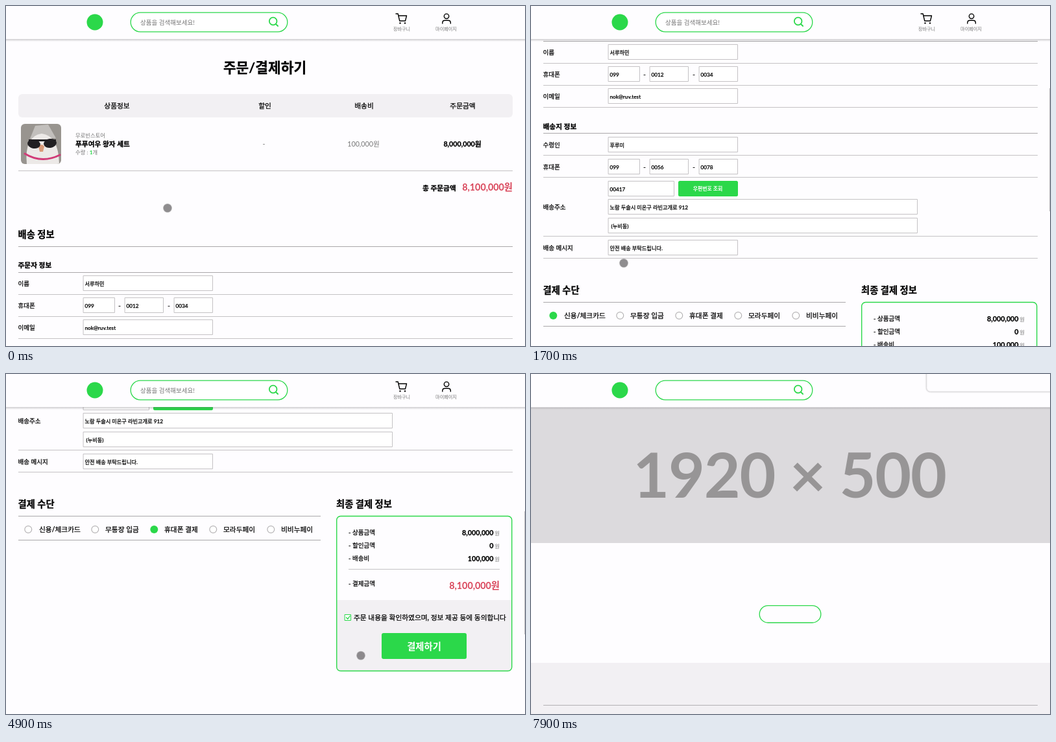
An HTML page with a canvas for the animation above (8 s loop, 800 px wide and 525 px high).

```html
<!DOCTYPE html>
<html lang="ko">
<head>
<meta charset="utf-8">
<title>주문/결제하기</title>
<style>
html, body { margin: 0; width: 100%; height: 100%; overflow: hidden; background: #fefdff; }
canvas { display: block; width: 800px; height: 525px; }
</style>
</head>
<body>
<canvas id="stage" width="800" height="525"></canvas>
<script>
const ctx = document.getElementById('stage').getContext('2d');
const FONT = 'Lato, "Noto Sans CJK KR", "Noto Sans CJK", sans-serif';
const PAGE = '#fefdff', PANEL = '#f2f0f3', GREEN = '#2bd84a', RED = '#d9455a';
const INK = '#000', MUTED = '#767676', LINE = '#c4c2c4', DARK_LINE = '#a9a7a9';
const LOOP = 8000, STEP = 100;

// Rem-like sizes of the scaled-down page
const XS = 7.14, S = 8.33, M = 9.53, L = 10.7, XL = 14.29;

// One entry per wheel notch
const NOTCH = 59.5;
const wheel = [100, 300, 500, 702, 1000, 1300, 1900, 2050, 3648, 4700];
const pointer = [
  [0, 249, 312], [800, 213, 335], [1700, 143, 397], [2300, 137, 366],
  [2900, 137, 362], [3200, 228, 362], [3400, 228, 362], [3800, 510, 420],
  [4100, 527, 436], [4700, 527, 436], [5500, 655, 428]
];
const methods = [
  [34, 51, '신용/체크카드'], [137, 153, '무통장 입금'], [228, 244, '휴대폰 결제'],
  [319, 335, '모라두페이'], [408, 424, '비비누페이']
];

function ease(x) {
  x = Math.min(1, Math.max(0, x));
  return x * x * (3 - 2 * x);
}

function scrollAt(t) {
  return Math.round(NOTCH * wheel.reduce((sum, start) => sum + ease((t - start) / 200), 0));
}

function pointerAt(t) {
  for (let i = 1; i < pointer.length; i++) {
    const [t0, x0, y0] = pointer[i - 1], [t1, x1, y1] = pointer[i];
    if (t < t1) {
      const k = ease((t - t0) / (t1 - t0));
      return [x0 + (x1 - x0) * k, y0 + (y1 - y0) * k];
    }
  }
  return pointer[pointer.length - 1].slice(1);
}

// y is the vertical middle of the glyphs; a hairline outline thickens medium and bold
function text(str, x, y, size, color = INK, weight = 500, align = 'left') {
  ctx.font = `${weight} ${size}px ${FONT}`;
  ctx.fillStyle = ctx.strokeStyle = color;
  ctx.textAlign = align;
  ctx.fillText(str, x, y + size * 0.37);
  if (weight < 500 || color !== INK) return;
  ctx.lineWidth = 0.25;
  ctx.lineJoin = 'round';
  ctx.strokeText(str, x, y + size * 0.37);
}

function bold(str, x, y, size, color, align) {
  text(str, x, y, size, color, 700, align);
}

function rule(x0, x1, y, color = LINE) {
  ctx.fillStyle = color;
  ctx.fillRect(x0, y, x1 - x0, 1);
}

function box(x, y, w, h, r, fill, stroke, lw = 1) {
  ctx.beginPath();
  ctx.roundRect(x, y, w, h, r);
  if (fill) { ctx.fillStyle = fill; ctx.fill(); }
  if (stroke) { ctx.strokeStyle = stroke; ctx.lineWidth = lw; ctx.stroke(); }
}

function disc(x, y, r, fill, stroke, lw = 1) {
  ctx.beginPath();
  ctx.arc(x, y, r, 0, Math.PI * 2);
  if (fill) { ctx.fillStyle = fill; ctx.fill(); }
  if (stroke) { ctx.strokeStyle = stroke; ctx.lineWidth = lw; ctx.stroke(); }
}

function strokePath(d, color, lw) {
  ctx.strokeStyle = color;
  ctx.lineWidth = lw;
  ctx.lineCap = ctx.lineJoin = 'round';
  ctx.stroke(new Path2D(d));
}

function field(value, x, y, w) {
  box(x + 0.5, y + 0.5, w - 1, 23, 0, '#fff', LINE);
  text(value, x + 2.5, y + 12.5, 8.2);
}

function phone(y, a, b, c) {
  text('휴대폰', 18.5, y + 12.5, M);
  field(a, 119, y, 49);
  text('-', 175, y + 12.5, M, INK, 500, 'center');
  field(b, 183, y, 60);
  text('-', 251, y + 12.5, M, INK, 500, 'center');
  field(c, 259, y, 60);
}

function row(label, value, y) {
  text(label, 18.5, y + 12.5, M);
  field(value, 119, y, 200);
}

function photo() {
  ctx.save();
  ctx.beginPath();
  ctx.roundRect(23, 182, 62, 62, 6);
  ctx.clip();
  ctx.fillStyle = '#98948f';
  ctx.fillRect(23, 182, 62, 62);
  ctx.fillStyle = '#c2bfbc';
  ctx.fill(new Path2D('M37 205 L45 185 L65 183 L77 204 Z'));
  ctx.fillStyle = '#ece9e7';
  ctx.fill(new Path2D('M32 244 Q28 201 55 197 Q81 200 82 244 Z'));
  strokePath('M29 228 Q55 244 83 230', '#d13b78', 3);
  ctx.fillStyle = '#d99a78';
  ctx.fill(new Path2D('M50 217 Q55 211 59 217 L57 225 L52 225 Z'));
  ctx.fillStyle = '#211f22';
  ctx.beginPath();
  ctx.ellipse(43, 213, 10, 7, 0.15, 0, 7);
  ctx.ellipse(68, 212, 10, 7, -0.15, 0, 7);
  ctx.fill();
  ctx.fillRect(35, 206, 42, 3);
  ctx.restore();
}

function header(loaded) {
  const shade = ctx.createLinearGradient(0, 51, 0, 55);
  shade.addColorStop(0, 'rgba(80,78,82,.28)');
  shade.addColorStop(1, 'rgba(80,78,82,0)');
  ctx.fillStyle = shade;
  ctx.fillRect(0, 51, 800, 4);
  ctx.fillStyle = PAGE;
  ctx.fillRect(0, 0, 800, 51);
  disc(137, 25, 12.5, GREEN);
  box(192.2, 10.2, 241.6, 29.6, 14.8, '#fff', GREEN, 1.3);
  disc(411.7, 23.5, 5.8, null, GREEN, 1.8);
  strokePath('M416 28 L419.2 31', GREEN, 1.8);
  if (!loaded) return;
  text('상품을 검색해보세요!', 207, 25.5, M, MUTED, 400);
  strokePath('M601 12 H604.2 L606.8 23 H615.5 L617.5 15 H605', INK, 1.4);
  disc(607.5, 26.4, 1.2, INK);
  disc(615, 26.4, 1.2, INK);
  disc(679, 15.8, 3.7, null, INK, 1.4);
  strokePath('M672.8 27 V26 Q672.8 22.3 676.5 22.3 H681.5 Q685.3 22.3 685.3 26 V27', INK, 1.4);
  text('장바구니', 610, 35.5, XS, MUTED, 500, 'center');
  text('마이페이지', 678.5, 35.5, XS, MUTED, 500, 'center');
}

function products() {
  bold('주문/결제하기', 399, 95, 21.43, INK, 'center');
  box(19, 136, 762, 36, 6, PANEL);
  [['상품정보', 171], ['할인', 399], ['배송비', 552], ['주문금액', 704]]
    .forEach(([label, x]) => text(label, x, 154, L, INK, 500, 'center'));
  photo();
  text('무로빈스토어', 107, 199.5, S, MUTED, 400);
  bold('푸푸여우 왕자 세트', 107, 213, L);
  text('수량 : ', 107, 226, S, MUTED, 400);
  const w = ctx.measureText('수량 : ').width;
  text('1', 107 + w, 226, S, GREEN, 700);
  text('개', 107 + w + ctx.measureText('1').width, 226, S, MUTED, 400);
  text('-', 397.5, 213, L, MUTED, 400, 'center');
  text('100,000원', 551, 213, L, MUTED, 400, 'center');
  bold('8,000,000원', 703.5, 213, L, INK, 'center');
  rule(19, 781, 254);
  bold('총 주문금액', 642, 281, L);
  bold('8,100,000원', 781, 280, XL, RED, 'right');
}

function delivery() {
  bold('배송 정보', 18.5, 352.5, XL);
  rule(19, 781, 371, DARK_LINE);
  bold('주문자 정보', 18.5, 400.5, L);
  rule(19, 781, 411, DARK_LINE);
  row('이름', '서루하민', 416);
  phone(450, '099', '0012', '0034');
  row('이메일', 'nok@ruv.test', 484);

  bold('배송지 정보', 18.5, 543, L);
  rule(19, 781, 553, DARK_LINE);
  row('수령인', '후루미', 559);
  phone(593, '099', '0056', '0078');
  field('00417', 119, 627, 102);
  box(227, 627, 92, 24, 2.5, GREEN);
  bold('우편번호 조회', 272.5, 639.5, 7.94, '#fff', 'center');
  text('배송주소', 18.5, 667.5, M);
  field('노람 두솔시 미온구 라빈고개로 912', 119, 655, 477);
  field(' (누비동)', 119, 684, 477);
  row('배송 메시지', '안전 배송 부탁드립니다.', 718);
  [445, 479, 513, 587, 621, 712, 746].forEach(y => rule(19, 781, y));
}

function payment(selected, agreed) {
  bold('결제 수단', 18.5, 795.5, XL);
  rule(19, 485, 814, DARK_LINE);
  rule(19, 485, 851, DARK_LINE);
  methods.forEach(([x, labelX, label], i) => {
    if (i === selected) disc(x + 0.3, 835, 6, GREEN);
    else disc(x + 0.3, 835, 5.4, '#fff', '#b5b3b5', 1.2);
    text(label, labelX, 835, L);
  });

  bold('최종 결제 정보', 509, 795.5, XL);
  box(509.7, 814.5, 270, 239, 6, PAGE);
  box(509.7, 944, 270, 109.5, [0, 0, 6, 6], PANEL);
  box(509.7, 814.5, 270, 239, 6, null, GREEN, 1.4);
  [['상품금액', '8,000,000'], ['할인금액', '0'], ['배송비', '100,000']]
    .forEach(([label, sum], i) => {
      const y = 839.5 + i * 19.8;
      text('- ' + label, 528, y, M);
      bold(sum, 751.5, y + 1, L, INK, 'right');
      text('원', 761, y + 1.5, S, MUTED, 400, 'right');
    });
  rule(528, 761, 896);
  text('- 결제금액', 528, 918.5, M);
  bold('8,100,000원', 761, 921.5, XL, RED, 'right');

  box(522.5, 966.5, 9, 9, 0, '#fff', agreed ? GREEN : LINE);
  if (agreed) strokePath('M524.5 971 L526.7 973.3 L530 968.8', GREEN, 1.3);
  text('주문 내용을 확인하였으며, 정보 제공 등에 동의합니다', 536, 971.5, L);
  box(579, 995, 131, 40, 3, agreed ? GREEN : '#c4c2c4');
  bold('결제하기', 644.5, 1015.5, XL, '#fff', 'center');
}

function dialog() {
  ctx.save();
  ctx.shadowColor = 'rgba(0,0,0,.15)';
  ctx.shadowBlur = 2;
  box(609.5, -20, 220, 47.5, 6, PAGE, '#dcdadd');
  ctx.restore();
}

function checkout(t) {
  const top = scrollAt(t);
  ctx.save();
  ctx.translate(0, -top);
  products();
  delivery();
  payment(t < 2800 ? 0 : t < 3300 ? 1 : 2, t >= 4200);
  ctx.restore();
  if (top > 0) {
    ctx.fillStyle = '#c3c1c4';
    ctx.fillRect(799, Math.round(top * 0.357), 1, 190);
  }
  header(true);
  const [x, y] = pointerAt(t);
  disc(x, y, 6.3, 'rgba(100,97,100,.72)', 'rgba(150,148,150,.6)', 1.2);
}

function home() {
  ctx.fillStyle = '#dcdadd';
  ctx.fillRect(0, 52, 800, 209);
  ctx.font = `700 96.5px ${FONT}`;
  ctx.letterSpacing = '-1.2px';
  ctx.fillStyle = '#979596';
  ctx.textAlign = 'center';
  ctx.fillText('1920 × 500', 398.5, 191);
  ctx.letterSpacing = '0px';
  box(352.2, 357.7, 94.6, 26.3, 13.1, null, GREEN, 1.3);
  ctx.fillStyle = PANEL;
  ctx.fillRect(0, 446, 800, 79);
  rule(19, 781, 511, '#b3b1b4');
  header(false);
}

function draw(t) {
  ctx.fillStyle = PAGE;
  ctx.fillRect(0, 0, 800, 525);
  if (t < 7700) checkout(t);
  else home();
  if (t >= 6900) dialog();
}

const began = performance.now();
function tick() {
  const t = (performance.now() - began) % LOOP;
  draw(Math.floor(t / STEP) * STEP);
  requestAnimationFrame(tick);
}
tick();
</script>
</body>
</html>
```
